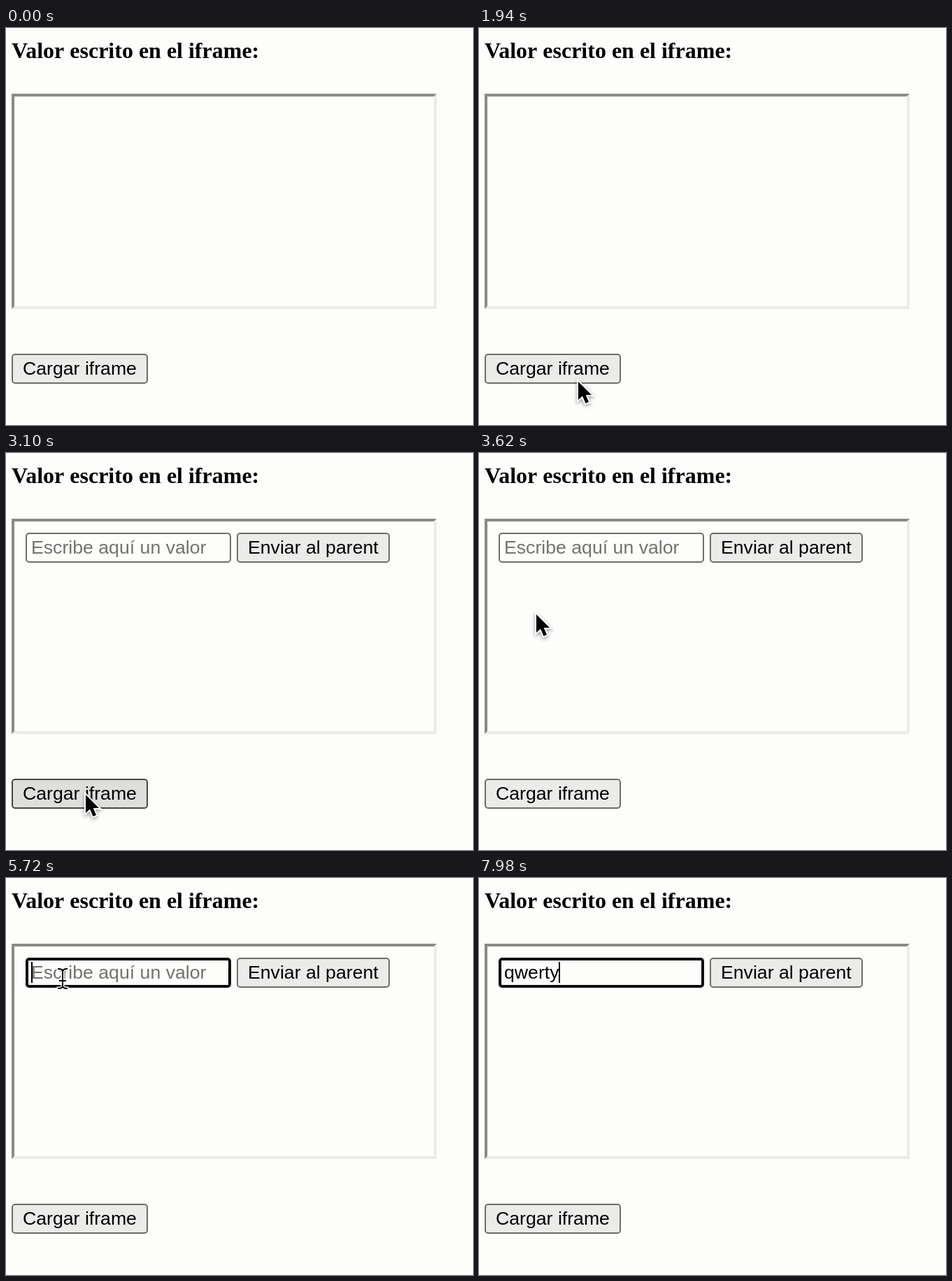
These frames come from a looping animation (668x568 px, 8000 ms). An HTML page with a canvas:

```html
<!DOCTYPE html>
<html lang="es">
<head>
<meta charset="utf-8">
<title>Valor escrito en el iframe</title>
<style>
  html, body { margin: 0; width: 100%; height: 100%; overflow: hidden; background: #fdfdfb; }
  canvas { display: block; }
</style>
</head>
<body>
<canvas id="stage" width="668" height="568"></canvas>
<script>
const ctx = document.getElementById('stage').getContext('2d');
const LOOP = 8000;
const PAGE = '#fdfdfb';
const SANS = '26.667px "Liberation Sans", Arial, sans-serif';
const SERIF = 'bold 32px "Liberation Serif", "Times New Roman", serif';

const LOADED = 2840, FOCUSED = 5300;
const KEYS = [[6480, 'q'], [6880, 'w'], [7060, 'e'], [7240, 'r'], [7440, 't'], [7700, 'y']];

// Pointer path: time, x, y
const PATH = [
  [1500, 158, 574], [1720, 154, 535], [1920, 142, 506], [2500, 142, 506],
  [2700, 114, 489], [3140, 114, 489], [3260, 110, 474], [3620, 82, 231],
  [4120, 82, 205], [4420, 81, 150], [4740, 81, 144]
];

const ARROW = [[0, 0], [0, 26], [6, 20.5], [10.5, 31], [15, 29], [10.7, 19], [19, 19]];

function pointerAt(t) {
  let a = PATH[0];
  for (const b of PATH) {
    if (t < b[0]) {
      const u = (t - a[0]) / (b[0] - a[0]);
      const e = u * u * (3 - 2 * u);
      return { x: a[1] + (b[1] - a[1]) * e, y: a[2] + (b[2] - a[2]) * e };
    }
    a = b;
  }
  return { x: a[1], y: a[2] };
}

function text(str, x, y, font, color) {
  ctx.font = font;
  ctx.fillStyle = color;
  ctx.fillText(str, x, y);
}

function poly(points, color) {
  ctx.beginPath();
  points.forEach(([x, y]) => ctx.lineTo(x, y));
  ctx.closePath();
  ctx.fillStyle = color;
  ctx.fill();
}

function box(x, y, w, h, fill, border, line) {
  ctx.beginPath();
  ctx.roundRect(x + line / 2, y + line / 2, w - line, h - line, 5 - line / 2);
  ctx.fillStyle = fill;
  ctx.fill();
  ctx.strokeStyle = border;
  ctx.lineWidth = line;
  ctx.stroke();
}

function button(label, x, y, w, hover) {
  box(x, y, w, 43, hover ? '#dededc' : '#ebebea', hover ? '#474742' : '#6e6e68', 2);
  text(label, x + 16, y + 30, SANS, '#000');
}

function insetFrame() {
  const l = 8, t = 94, r = 616, b = 402, w = 4;
  const dark = [[l, b], [l, t], [r, t], [r - w, t + w], [l + w, t + w], [l + w, b - w]];
  const light = [[r, t], [r, b], [l, b], [l + w, b - w], [r - w, b - w], [r - w, t + w]];
  poly(light, '#ebebe8');
  poly(dark, '#8b8b86');
}

function field(t, hover) {
  const focused = t >= FOCUSED;
  const border = focused ? '#0a0a0a' : hover ? '#333330' : '#6e6e6b';
  box(28, 114, 294, 43, '#fdfdfc', border, focused ? 4 : 2);

  const typed = KEYS.filter(k => t >= k[0]);
  const value = typed.map(k => k[1]).join('');
  if (value) text(value, 36, 144, SANS, '#000');
  else text('Escribe aquí un valor', 36, 144, SANS, '#72726e');

  if (!focused) return;
  const since = typed.length ? typed[typed.length - 1][0] : FOCUSED;
  if ((t - since) % 1000 < 500) {
    ctx.font = SANS;
    ctx.fillStyle = '#000';
    ctx.fillRect(Math.round(35.5 + ctx.measureText(value).width), 120, 2, 30);
  }
}

function arrow(x, y) {
  ctx.save();
  ctx.translate(x, y);
  ctx.beginPath();
  ARROW.forEach(p => ctx.lineTo(p[0], p[1]));
  ctx.closePath();
  ctx.lineJoin = 'miter';
  ctx.lineWidth = 4;
  ctx.strokeStyle = '#fff';
  ctx.shadowColor = 'rgba(0,0,0,0.4)';
  ctx.shadowBlur = 5;
  ctx.shadowOffsetY = 2;
  ctx.stroke();
  ctx.shadowColor = 'transparent';
  ctx.fillStyle = '#000';
  ctx.fill();
  ctx.restore();
}

function beam(x, y) {
  ctx.save();
  ctx.translate(x, y);
  ctx.beginPath();
  for (const s of [-1, 1]) {
    ctx.moveTo(-6, s * 14);
    ctx.quadraticCurveTo(0, s * 14, 0, s * 10);
    ctx.quadraticCurveTo(0, s * 14, 6, s * 14);
  }
  ctx.moveTo(0, -11);
  ctx.lineTo(0, 11);
  ctx.moveTo(-4, 3);
  ctx.lineTo(4, 3);
  ctx.lineCap = 'square';
  for (const [w, c] of [[5, '#fff'], [2, '#000']]) {
    ctx.lineWidth = w;
    ctx.strokeStyle = c;
    ctx.stroke();
  }
  ctx.restore();
}

function draw(t) {
  const p = pointerAt(t);
  const loaded = t >= LOADED;
  const overField = loaded && p.y > 114 && p.y < 157;
  const overLoad = t > 1500 && p.y > 466 && p.y < 505;

  ctx.fillStyle = PAGE;
  ctx.fillRect(0, 0, 668, 568);
  text('Valor escrito en el iframe:', 8, 43, SERIF, '#000');
  insetFrame();
  if (loaded) {
    field(t, overField);
    button('Enviar al parent', 330, 114, 219, false);
  }
  button('Cargar iframe', 8, 466, 195, overLoad);

  // The pointer hides once typing begins
  if (t >= PATH[0][0] && t < KEYS[0][0]) (overField ? beam : arrow)(p.x, p.y);
}

const start = performance.now();
function tick() {
  draw((performance.now() - start) % LOOP);
  requestAnimationFrame(tick);
}
tick();
</script>
</body>
</html>
```
